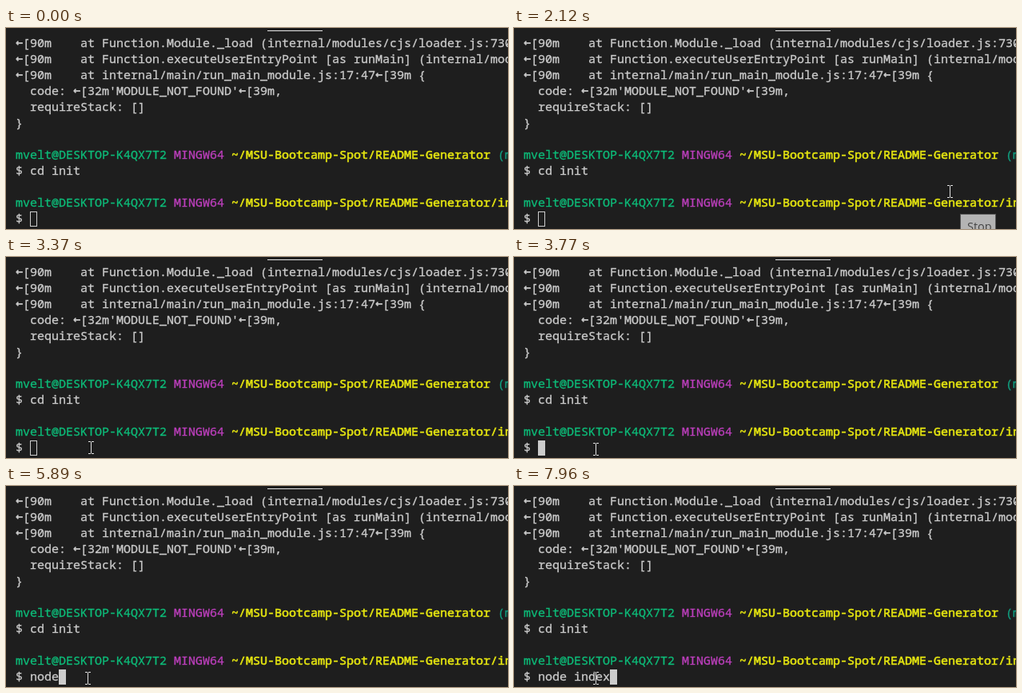
Animation of 628x252 px, one loop 8 s. Source, as an HTML page:

```html
<!DOCTYPE html>
<html lang="en">
<head>
<meta charset="utf-8">
<title>Terminal</title>
<style>
  html, body { margin: 0; width: 100%; height: 100%; overflow: hidden; background: #1e1e1e; }
  #stage { position: relative; width: 628px; height: 252px; overflow: hidden; background: #1e1e1e; isolation: isolate; }
  #stage > * { position: absolute; box-sizing: border-box; }
  pre { left: 12px; top: 8px; margin: 0; color: #ccc; -webkit-text-stroke: .3px;
    font: 15px/20px "Noto Sans Mono", "DejaVu Sans Mono", monospace; }
  pre i { display: inline-block; width: 9px; height: 20px; vertical-align: top;
    font: bold 15px/20px "DejaVu Sans Mono", monospace; }
  .user { color: #0dbc79; }
  .system { color: #bc3fbc; }
  .path { color: #e5e510; -webkit-text-stroke: .6px; }
  .branch { color: #11a080; }
  #tab { left: 327px; top: 3px; width: 69px; height: 1px; background: #e7e7e7; }
  #cursor { top: 230px; width: 9px; height: 19px; border: 1px solid #ccc; }
  #cursor.focused { background: #ccc; }
  #tooltip { left: 558px; top: 233px; width: 45px; height: 30px; padding-left: 8px; border: 1px solid #767676;
    background: #fff; color: #575757; font: 14.5px/30px "Open Sans", sans-serif; }
  #pointer { left: 0; top: 0; mix-blend-mode: difference; }
</style>
</head>
<body>
<div id="stage">
  <pre id="screen"></pre>
  <div id="tab"></div>
  <div id="cursor"></div>
  <div id="tooltip">Stop</div>
  <svg id="pointer" width="7" height="16" shape-rendering="crispEdges">
    <path d="M0 .5H3M4 .5H7M3.5 1V15M0 15.5H3M4 15.5H7" stroke="#fff" fill="none"/>
  </svg>
</div>
<script>
const LOOP = 8000, CELL = 9, LEFT = 12;
const $ = id => document.getElementById(id);
const esc = code => `<i>←</i>[${code}m`;
const prompt = (path, branch) =>
  `<span class="user">mvelt@DESKTOP-K4QX7T2</span> <span class="system">MINGW64</span> ` +
  `<span class="path">~/MSU-Bootcamp-Spot/${path}</span> <span class="branch">(${branch})</span>`;

$("screen").innerHTML = [
  `${esc(90)}    at Function.Module._load (internal/modules/cjs/loader.js:730:14)`,
  `${esc(90)}    at Function.executeUserEntryPoint [as runMain] (internal/modules/run_main.js:72:12)`,
  `${esc(90)}    at internal/main/run_main_module.js:17:47${esc(39)} {`,
  `  code: ${esc(32)}'MODULE_NOT_FOUND'${esc(39)},`,
  "  requireStack: []",
  "}",
  "",
  prompt("README-Generator", "main"),
  "$ cd init",
  "",
  prompt("README-Generator/init", "main"),
  `$ <span id="typed"></span>`
].join("\n");

const COMMAND = "node index";
const KEY_TIMES = [5030, 5290, 5690, 5890, 6550, 6900, 7170, 7370, 7630, 7960];
const FOCUS_TIME = 3570;

// Progress from 0 to 1 in equal steps of the given length.
const stepped = (t, start, steps, stepLength) =>
  Math.max(0, Math.min(1, Math.floor((t - start) / stepLength) / steps));

// The pointer sweeps left and out below, comes back up, then makes a small arc.
function pointerAt(t) {
  const sweep = stepped(t, 2120, 11, 70);
  const rise = stepped(t, 2950, 3, 70);
  const arc = stepped(t, 3270, 5, 100);
  const bump = Math.sin(Math.PI * arc);
  if (t < 2120) return [545, 270];
  if (t < 2950) return [545 - 435 * Math.sin(sweep * Math.PI / 2), 205 + 39 * sweep + 19 * sweep ** 2];
  return [109 - 7 * rise + 7 * bump, 258 - 13 * rise - 4 * arc - 8 * bump];
}

function draw(t) {
  const count = KEY_TIMES.filter(time => time <= t).length;
  $("typed").textContent = COMMAND.slice(0, count);
  $("cursor").style.left = LEFT + (2 + count) * CELL + "px";
  $("cursor").classList.toggle("focused", t >= FOCUS_TIME);
  $("tooltip").style.opacity = stepped(t, 480, 2, 60) - stepped(t, 2050, 3, 70);
  const [x, y] = pointerAt(t).map(Math.round);
  $("pointer").style.transform = `translate(${x - 3}px, ${y - 8}px)`;
}

const start = performance.now();
function tick() {
  draw((performance.now() - start) % LOOP);
  requestAnimationFrame(tick);
}
tick();
</script>
</body>
</html>
```
